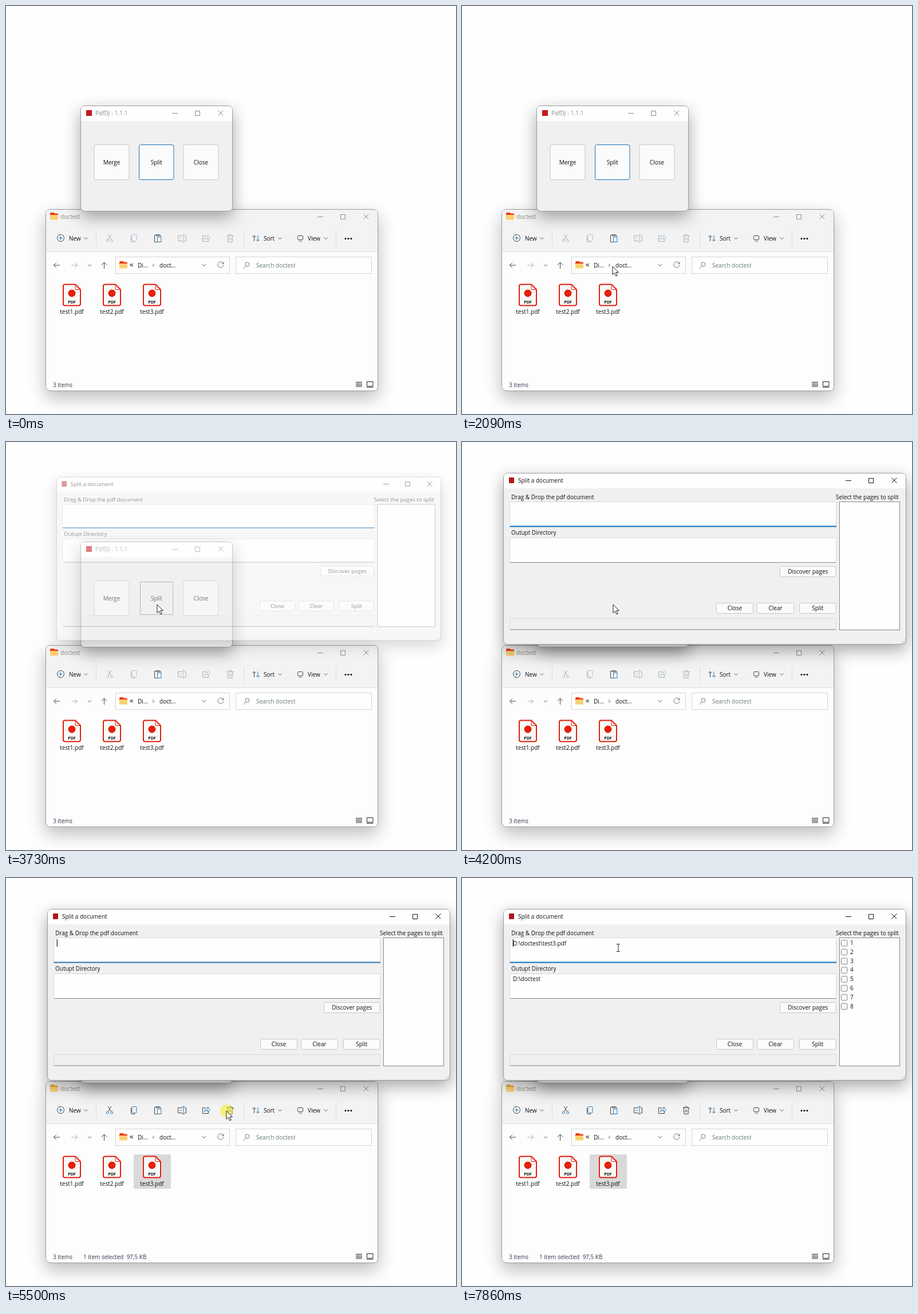
An HTML page that plays this animation: 786 px wide and 713 px high, repeating every 8 s.

```html
<!DOCTYPE html>
<html lang="en">
<head>
<meta charset="utf-8">
<title>Split a document</title>
<style>
html, body { margin: 0; width: 100%; height: 100%; overflow: hidden; background: #fefefe; }
svg { display: block; width: 786px; height: 713px; }
text { font: 10px "Open Sans", "Noto Sans", sans-serif; fill: #111; white-space: pre; }
.mid { text-anchor: middle; }
.line { fill: none; stroke: #444; }
.blue { fill: none; stroke: #2b78b5; }
.frame { fill: #f0f0f0; stroke: #9c9c9c; }
.shadow { filter: drop-shadow(0 10px 14px rgba(0,0,0,.34)); }
.soft { filter: drop-shadow(0 12px 15px rgba(0,0,0,.26)); }
.bar text { fill: #111; }
.bar .ctl { fill: none; stroke: #111; }
.off .bar text { fill: #8c8c80; }
.off .bar .ctl { stroke: #8c8c8c; }
.dim { opacity: .4; }
.btn { fill: #fbfbfb; stroke: #c6c6c6; }
</style>
</head>
<body>
<svg id="stage" viewBox="0 0 786 713"></svg>
<script>
const RED = '#e3200c', ACCENT = [16, 110, 190], GREY = [134, 134, 134];

// Markup helpers; text is placed by the middle of its line.
const text = (x, y, s, more = '') => `<text x="${x}" y="${y + 3.5}" ${more}>${s}</text>`;
const label = (x, y, s) => text(x, y, s, 'class="mid"');
const rect = (x, y, w, h, more = '') => `<rect x="${x}" y="${y}" width="${w}" height="${h}" ${more}/>`;
const path = (d, cls = 'line', more = '') => `<path d="${d}" class="${cls}" ${more}/>`;
const group = (id, body, more = '') => `<g id="${id}" ${more}>${body}</g>`;
const at = (x, y, body, more = '') => `<g transform="translate(${x} ${y})" ${more}>${body}</g>`;
const button = (x, y, w, h, s, id = '') =>
  rect(x, y, w, h, `rx="3" class="btn" ${id && `id="${id}"`}`) + label(x + w / 2, y + h / 2, s);
const chevron = (x, y) => path(`M${x - 3} ${y - 1.5}l3 3 3-3`, 'line', 'stroke-width=".9"');
const controls = (x, y) => path(
  `M${x - 5} ${y + .5}h10M${x + 35.5} ${y - 3.5}h8v8h-8zM${x + 75.5} ${y - 4.5}l9 9m0-9l-9 9`, 'ctl');
const topRound = (x, y, w, h, fill) =>
  `<path d="M${x} ${y + h}v${7 - h}q0-7 7-7h${w - 14}q7 0 7 7v${h - 7}z" fill="${fill}"/>`;

const folder = (x, y, id) => at(x, y,
  `<path d="M0 2q0-2 2-2h4l2 1.5h4q2 0 2 2v7.5H0z" fill="#e9a63a" ${id ? `id="${id}"` : ''}/>` +
  rect(0, 4, 14, 8.5, 'rx="1.3" fill="#fbcf73"'));

const pdfFile = (x, name) => at(x, 485,
  `<path d="M-12 1.5h18l9 9v25q0 3-3 3h-24q-3 0-3-3v-31q0-3 3-3z" fill="#fafafa" stroke="${RED}" stroke-width="2"/>` +
  path('M6 2v8.5h9', 'line', `style="stroke:${RED}"`) +
  `<circle cx="0" cy="17" r="6.5" fill="${RED}"/>` +
  text(0, 31, 'PDF', 'class="mid" style="font-size:7px;font-weight:700"') +
  label(0, 49, name));

function launcher() {
  return rect(130.5, 174.5, 265, 184, 'rx="7" class="frame shadow"') +
    topRound(131, 175, 264, 26, '#fefefe') +
    group('', rect(140, 182, 10, 10, 'fill="#c8161d"') + text(156, 187.5, 'PdfDJ - 1.1.1') +
      controls(295, 187), 'class="bar"') +
    button(154, 242.5, 61, 61, 'Merge') + button(232.5, 242.5, 60.5, 61, 'Split', 'splitBtn') +
    button(310, 242.5, 61, 61, 'Close') +
    rect(234.5, 244.5, 57, 57, 'id="focus" fill="none" stroke="#222" stroke-dasharray="1 1"');
}

function tools() {
  const cut = path('M178 399l5.5 9M184 399l-5.5 9') +
    '<g class="blue"><circle cx="177.3" cy="410" r="2"/><circle cx="184.7" cy="410" r="2"/></g>';
  const copy = path('M221.5 399.5h5q1.5 0 1.5 1.5v8q0 1.5-1.5 1.5h-5q-1.500 0-1.500-1.500v-8q0-1.500 1.500-1.500z', 'blue') +
    path('M218.500 401.500v9q0 2 2 2h5');
  const paste = path('M262 400.500h-2.500v12h4M267.500 400.500h2.500v2M262.500 399.500h5v2h-5z') +
    path('M264.500 403.500h6.500v9h-6.500z', 'blue');
  const rename = path('M308 401.500h-7.500v9h7.500M312 401.500h2.500v9h-2.500') +
    path('M310 399.500v13M308 399.500h4M308 412.500h4M303 406h4', 'blue');
  const share = path('M349 401.500h-5.500v10h10v-4') +
    path('M346.500 408q.5-5 6-5v-3l4 4.500-4 4.500v-3q-4 0-6 2z', 'blue');
  const bin = path('M385.500 401.500h12M389 401q0-2 2.500-2t2.500 2M387 401.500l1 11h7l1-11M390.200 404.500v5M392.800 404.500v5');
  return group('editA', cut + copy) + paste + group('editB', rename + share + bin);
}

function explorer() {
  const seps = [157.5, 415.5, 576.5].map(x => `M${x} 392v28`).join('');
  const dots = [593, 598, 603].map(x => `<circle cx="${x}" cy="406.500" r="1.500"/>`).join('');
  return rect(69.5, 355.5, 580, 317, 'rx="7" class="frame soft" style="fill:#fdfdfd"') +
    topRound(70, 356, 579, 73, '#f3f3f3') +
    path('M70 429.500h579', 'line', 'style="stroke:#dfdfdf"') +
    group('', folder(77, 361, 'tab') + text(95, 368.5, 'doctest') + controls(549, 368), 'class="bar"') +
    '<circle cx="95.500" cy="405.500" r="6" class="line"/>' + path('M95.500 402.500v6M92.500 405.500h6', 'blue') +
    text(110, 406.5, 'New') + chevron(139.5, 406) + path(seps, 'line', 'style="stroke:#dcdcdc"') +
    tools() + path('M433.500 411v-10l-3 3m3-3l3 3') + path('M440 401v10l-3-3m3 3l3-3', 'blue') +
    text(450, 406.5, 'Sort') + chevron(478.5, 406) +
    path('M510.500 401.500h7q1 0 1 1v5q0 1-1 1h-7q-1 0-1-1v-5q0-1 1-1z') + path('M511 411h6', 'blue') +
    text(527, 406.5, 'View') + chevron(558.5, 406) + dots +
    path('M94 453H83.500m4.500-4.500l-4.500 4.500 4.500 4.500') +
    path('M114 453h10.500m-4.500-4.500l4.500 4.500-4.500 4.500', 'line dim') + chevron(146, 453) +
    path('M171.500 459v-11m-4.500 4.500l4.500-4.500 4.500 4.500') +
    rect(191.5, 438.5, 199, 29, 'fill="#fefefe" stroke="#d4d4d4"') +
    folder(198, 446, 'crumb') + text(216, 452, '«', 'style="font-size:13px"') + text(230, 453, 'Di...') +
    path('M256 450.500l2.500 2.500-2.500 2.500') + text(268, 453, 'doct...') +
    path('M342.500 451l3.500 3.500 3.500-3.500', 'line', 'stroke-width=".9"') +
    path('M379.500 450a5 5 0 1 0 .5 2.500M380 447v3.500h-3.500', 'line', 'style="stroke:#777"') +
    rect(401.5, 438.5, 237, 29, 'fill="#fefefe" stroke="#d4d4d4"') +
    '<circle cx="421.500" cy="451.500" r="3.500" class="line" style="stroke:#777"/>' +
    path('M419 454.500l-4 4', 'line', 'style="stroke:#777"') +
    text(437, 453, 'Search doctest', 'style="fill:#6c7b7b"') +
    rect(223, 483, 65, 60, 'id="pick" rx="1"') +
    [1, 2, 3].map(i => pdfFile(45 + 70 * i, `test${i}.pdf`)).join('') +
    text(82, 662, '3 items', 'style="fill:#2f3a50"') +
    group('status', text(135, 662, '1 item selected  97,5 KB', 'style="fill:#2f3a50"')) +
    path('M611 657.500h11m-11 2.500h11m-11 2.500h11m-11 2.500h11', 'line', 'style="stroke:#222"') +
    path('M630.500 656.500h10.500v8h-10.500zM630 666.500h11.500', 'line', 'style="stroke:#222"');
}

function dialog() {
  const row = i => {
    const y = 113.5 + 15.8 * i;
    return rect(662.5, y - 5, 10.500, 10.500, 'rx="2" fill="#f7f7f7" stroke="#858585"') + text(678, y, i + 1);
  };
  const rows = Array.from({ length: 8 }, (_, i) => row(i)).join('');
  const grip = [[773, 345], [770, 348], [773, 348], [767, 351], [770, 351], [773, 351]]
    .map(([x, y]) => rect(x, y, 1.5, 1.5, 'fill="#aaa"')).join('');
  return rect(72.5, 54.5, 703, 299, 'rx="7" class="frame shadow"') +
    topRound(73, 55, 702, 26, '#fefefe') +
    group('', rect(82, 62, 9, 10, 'fill="#b0181e"') + text(98, 67.5, 'Split a document') +
      controls(675, 67), 'class="bar"') +
    text(86, 96, 'Drag &amp; Drop the pdf document') + text(653, 96, 'Select the pages to split') +
    rect(83.5, 104.5, 570, 43, 'rx="1" fill="#fefefe" stroke="#d8d8d8"') +
    rect(83.5, 146.5, 570.5, 2, 'id="under"') + text(86, 158.5, 'Outupt Directory') +
    rect(83.5, 167.5, 570, 43, 'rx="1" fill="#fefefe" stroke="#d8d8d8"') +
    path('M84 210.500h569.500', 'line', 'style="stroke:#868686"') +
    rect(659.5, 104.5, 105, 224, 'fill="#fefefe" stroke="#868686"') +
    button(555.5, 217.5, 97.5, 18, 'Discover pages') + button(444.5, 281.5, 64, 18, 'Close') +
    button(515.5, 281.5, 64, 18, 'Clear') + button(589.5, 281.5, 63.5, 18, 'Split') +
    rect(83.5, 308.5, 570, 19, 'rx="1" fill="#efefef" stroke="#dcdcdc"') +
    path('M84 328h569.500', 'line', 'style="stroke:#868686"') + grip +
    group('file', text(89, 114, 'D:\\doctest\\test3.pdf')) +
    group('dir', text(89, 176.5, 'D:\\doctest')) + group('pages', rows) +
    rect(88.7, 107, 1.1, 13, 'id="caret"');
}

function pointer() {
  return '<circle id="glow" r="11" fill="#f5ee28" opacity=".6"/>' +
    path('M0 0V14.500L3.400 11.400 5.900 17 8.200 16 5.800 10.500H10.300Z', '', 'id="arrow" fill="#fff" stroke="#222"') +
    group('deny', '<circle r="6.300"/><path d="M-4.500-4.500l9 9"/>', 'fill="none" stroke="#cf4a08" stroke-width="2"') +
    path('M-3-6.500h2.200q.8 0 .8 1v11q0 1 .8 1H3M3-6.500H.8Q0-6.500 0-5.500M0 5.500q0 1-.8 1H-3', 'line', 'id="beam" style="stroke:#222"');
}

document.getElementById('stage').innerHTML =
  group('explorer', explorer(), 'class="off"') + group('launcher', launcher()) +
  group('dialog', dialog()) + group('pointer', pointer());

const $ = id => document.getElementById(id);
const show = (id, on) => $(id).setAttribute('visibility', on ? 'inherit' : 'hidden');
const set = (id, name, value) => $(id).setAttribute(name, value);
const clamp = v => Math.min(1, Math.max(0, v));
const out = u => 1 - (1 - u) ** 2;
const inOut = u => u * u * (3 - 2 * u);
const same = u => u;

// Pointer moves: start, end, steps, from, bend, to, easing.
const moves = [
  [850, 1630, 12, [730, 700], [430, 540], [266, 501], out],
  [1680, 1680, 1, [264, 500], [264, 500], [264, 500], same],
  [2090, 2860, 12, [263, 455], [266, 370], [262, 287], out],
  [2930, 3000, 2, [263, 286], [263, 285], [264, 284], same],
  [4400, 4820, 7, [264, 292], [266, 400], [263, 501], inOut],
  [5230, 5499, 5, [263, 501], [345, 480], [385, 407], inOut],
  [5566, 5970, 7, [387, 372], [375, 215], [310, 175], same],
  [6050, 6120, 2, [297, 163], [289, 156], [282, 149], same],
  [6190, 6470, 5, [279, 140], [275, 128], [273, 122], out],
];

function place(t) {
  const move = moves.filter(m => t >= m[0]).pop();
  if (!move) return null;
  const [start, end, n, a, b, c, ease] = move;
  const step = n > 1 ? (end - start) / (n - 1) : 1;
  const u = n > 1 ? ease(Math.min(n - 1, Math.floor((t - start) / step + 1e-6)) / (n - 1)) : 1;
  return [0, 1].map(i => (1 - u) ** 2 * a[i] + 2 * u * (1 - u) * b[i] + u * u * c[i]);
}

const inside = (p, x, y, w, h) => p && p[0] >= x && p[0] <= x + w && p[1] >= y && p[1] <= y + h;

function drawPointer(t, p) {
  show('pointer', p);
  if (!p) return;
  set('pointer', 'transform', `translate(${p[0].toFixed(1)} ${p[1].toFixed(1)})`);
  const dragging = t >= 5230 && t < 6400;
  const denied = dragging && p[1] < 353 && !inside(p, 84, 105, 569, 42);
  const typing = t >= 6470;
  show('glow', dragging || (t >= 3530 && t < 3600));
  show('deny', denied);
  show('beam', typing);
  show('arrow', !denied && !typing);
}

function drawLauncher(t, p) {
  const pressed = t >= 3530;
  const hover = !pressed && inside(p, 232, 243, 61, 61);
  set('launcher', 'class', t >= 3530 && t < 3670 ? '' : 'off');
  show('focus', pressed);
  $('splitBtn').style.fill = pressed ? '#f1f1f1' : hover ? '#e0eef9' : '#fbfbfb';
  $('splitBtn').style.stroke = pressed ? '#f0f0f0' : '#1a74b8';
}

function drawExplorer(t, p, switched) {
  const picked = t >= 5230;
  set('explorer', 'class', switched ? '' : 'off');
  for (const id of ['editA', 'editB']) set(id, 'class', picked ? '' : 'dim');
  show('status', picked);
  show('pick', picked || inside(p, 223, 483, 65, 60));
  set('pick', 'fill', !picked ? '#e5f3ff' : switched ? '#cce8ff' : '#d9d9d9');
  set('tab', 'fill', picked ? '#e9a63a' : '#ec3a10');
  set('crumb', 'fill', '#ec3a10');
}

function drawDialog(t, switched) {
  const k = clamp(Math.floor((t - 3600) / 67.5 + 1e-6) / 4);
  const scale = .92 + .08 * out(k);
  show('dialog', k > 0);
  set('dialog', 'opacity', out(k));
  set('dialog', 'transform', `translate(424 204) scale(${scale}) translate(-424 -204)`);
  set('dialog', 'class', switched ? 'off' : '');
  const tint = t < 5230 ? 1 : switched ? 0 : clamp((t - 5364) / 190);
  set('under', 'fill', `rgb(${ACCENT.map((v, i) => Math.round(GREY[i] + (v - GREY[i]) * tint))})`);
  show('file', k > 0 && t >= 6400);
  show('dir', t >= 6730);
  show('pages', t >= 6800);
  const blinkedOff = (t >= 4200 && t < 4730) || (t >= 7330 && t < 7860);
  show('caret', k === 1 && !blinkedOff && !switched);
}

function draw(t) {
  const p = place(t);
  const switched = t >= 5230 && t < 5432;
  drawExplorer(t, p, switched);
  drawLauncher(t, p);
  drawDialog(t, switched);
  drawPointer(t, p);
}

const began = performance.now();
function tick(now) {
  draw(Math.max(0, now - began) % 8000);
  requestAnimationFrame(tick);
}
draw(0);
requestAnimationFrame(tick);
</script>
</body>
</html>
```
